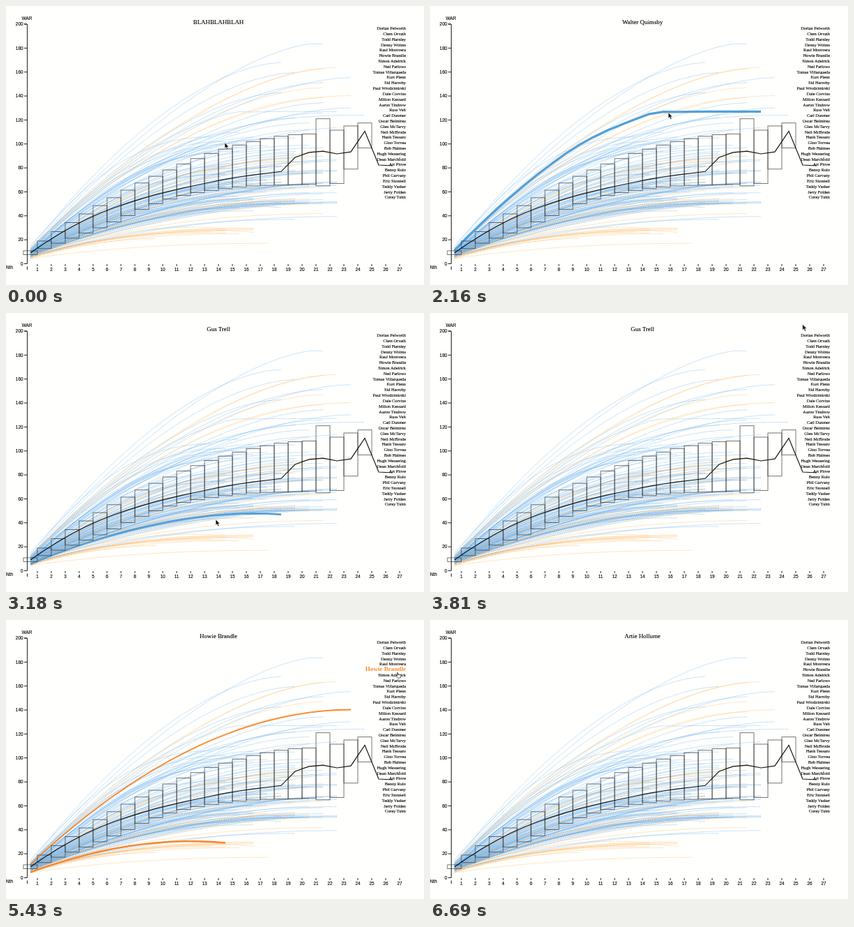
These frames come from a looping animation (600 by 400 pixels, 6.72 s). An HTML page:

```html
<!DOCTYPE html>
<html lang="en">
<head>
<meta charset="utf-8">
<title>Career WAR by season</title>
<style>
html, body { margin: 0; width: 100%; height: 100%; overflow: hidden; background: #fffffd; }
svg { display: block; width: 600px; height: 400px; }
text { fill: #000; stroke: #000; stroke-width: .12; }
.axis text { font: 6.4px "Liberation Sans", Arial, sans-serif; }
.axis path { fill: none; stroke: #222; stroke-width: 1; }
.names text { font: 6.3px "Liberation Serif", Times, serif; text-anchor: end; }
.names text.on { font-size: 9.1px; font-weight: bold; fill: #ff8a2a; stroke: none; }
#title { font: 8.9px "Liberation Serif", Times, serif; text-anchor: middle; }
.careers path { fill: none; stroke-width: .8; stroke-dasharray: 1.6 .9; opacity: .68; }
.hover path { fill: none; stroke-linejoin: round; }
.boxes rect { fill: none; stroke: #333; stroke-opacity: .75; stroke-width: .9; }
#median { fill: none; stroke: #111; stroke-width: 1.15; }
</style>
</head>
<body>
<svg viewBox="0 0 600 400">
  <g class="careers"></g>
  <g class="hover"></g>
  <g class="boxes"></g>
  <path id="median"/>
  <g class="axis"></g>
  <text id="title" x="305" y="26"></text>
  <g class="names"></g>
  <path id="arrow" d="M0 0V8.2L1.9 6.5L3.3 9.6L4.8 8.9L3.4 6H6Z" fill="#111" stroke="#fff" stroke-width=".5"/>
  <path id="hand" d="M1.4 .3Q2.4 -.3 2.6 .8V3L6.2 3.7Q7 4 6.8 5L6.1 8H2.3L-.3 5Q0 4 1.3 5Z" fill="#fff" stroke="#222" stroke-width=".7"/>
</svg>
<script>
const LOOP = 6720, FADE = 250, HOVER_WIDTH = 3.2;
const BLUE = '#529fda', ORANGE = '#fb8527';
const PALE_BLUE = '#68b0ee', PALE_ORANGE = '#ffb45e';
const $ = s => document.querySelector(s);
const X = season => 35 + 20 * season;
const Y = war => 369.5 - 1.7175 * war;
const range = (n, f) => Array.from({ length: n }, (_, i) => f(i));
const clamp = u => Math.max(0, Math.min(1, u));
const ease = u => u * u * (3 - 2 * u);

function add(parent, tag, attrs, text) {
  const el = document.createElementNS('http://www.w3.org/2000/svg', tag);
  for (const k in attrs) el.setAttribute(k, attrs[k]);
  if (text !== undefined) el.textContent = text;
  $(parent).appendChild(el);
  return el;
}

let seed = 71;
function rnd(low = 0, high = 1) {
  seed = (seed * 16807) % 2147483647;
  return low + (high - low) * seed / 2147483647;
}

// Rises steeply, flattens at the peak and declines after it.
const rise = (k, peak, power) => 1 - Math.abs(1 - k / peak) ** power;

// Smooth value at x through [x, value] keys.
function sample(keys, x) {
  const i = Math.max(0, Math.min(keys.length - 2, keys.findIndex(k => k[0] > x) - 1));
  const j = x >= keys[keys.length - 1][0] ? keys.length - 2 : i;
  const a = keys[j], b = keys[j + 1];
  const slope = (p, q) => (q[1] - p[1]) / (q[0] - p[0]);
  const w = b[0] - a[0], u = (x - a[0]) / w;
  const from = j ? slope(keys[j - 1], b) : slope(a, b) * 1.2;
  const to = slope(a, keys[j + 2] || b);
  return a[1] + (b[1] - a[1]) * ease(u) + w * u * (1 - u) * (from * (1 - u) - to * u);
}

const lineOf = wars => 'M' + wars.map((w, k) => `${X(k)} ${Y(w).toFixed(1)}`).join('L');

function career(seasons, total, power = 1.85, start = 3.5 + total * 0.055, peak = seasons) {
  return lineOf(range(seasons + 1, k => start + (total - start) * rise(k, peak, power)));
}

// Axes
for (let w = 0; w <= 200; w += 20) {
  add('.axis', 'path', { d: `M26 ${Y(w)}H30` });
  add('.axis', 'text', { x: 24.5, y: Y(w) + 2.3, 'text-anchor': 'end' }, w);
}
for (let n = 1; n <= 27; n++) {
  add('.axis', 'path', { d: `M${25 + 20 * n} 370V373` });
  add('.axis', 'text', { x: 25 + 20 * n, y: 380, 'text-anchor': 'middle' }, n);
}
add('.axis', 'path', { d: 'M26 26H30.5V369.5H26M30.5 373.5V378' });
add('.axis', 'text', { x: 22.8, y: 20 }, 'WAR');
add('.axis', 'text', { x: 0, y: 377 }, 'Nth');

// Quartile boxes and median: smooth at first, ragged where few careers remain
const lowKeys = [[0, 7.6], [5, 30], [10, 54], [15, 64], [20, 66.2]];
const midKeys = [[0, 9], [4, 37], [8, 54.4], [12, 65.8], [15, 72.5], [18, 77]];
const upper = range(21, i => 10.8 + 97.5 * rise(i, 20, 1.7)).concat(121, 111.5, 115, 117.5);
const lower = range(21, i => sample(lowKeys, i)).concat(65, 67, 79, 96.7);
const middle = range(19, i => sample(midKeys, i)).concat(88.8, 92.9, 94, 91.7, 93.4, 110.6, 82.4, 81.8);
upper.forEach((w, i) =>
  add('.boxes', 'rect', { x: 25 + 20 * i, y: Y(w), width: 20, height: Y(lower[i]) - Y(w) }));
$('#median').setAttribute('d', lineOf(middle));

// Names
const names = ['Dorian Pelworth', 'Clem Orvath', 'Todd Harnley', 'Denny Wolms', 'Raul Montvera',
  'Howie Brandle', 'Simon Adelrick', 'Ned Farlows', 'Tomas Villarqueda', 'Kurt Plenn',
  'Sid Harroby', 'Paul Wrodzimirski', 'Dale Corvins', 'Milton Kessard', 'Aaron Tindrow',
  'Russ Velt', 'Carl Dunmer', 'Oscar Belmirez', 'Glen McTarvy', 'Neil McBrode',
  'Hank Tessaro', 'Gino Torvea', 'Bob Halmes', 'Hugh Wessering', 'Dean Marchfold',
  'Art Plove', 'Benny Rulo', 'Phil Garvany', 'Eric Stonnell', 'Teddy Vasker',
  'Jerry Folden', 'Corey Tulm'];
const ROW = 7.81;
const labels = names.map((n, i) => add('.names', 'text', { x: 574, y: 34.2 + ROW * i }, n));

// Hovers on chart lines, then down the list at a steady pace
const hovers = [];
function hover(name, on, off, d, row = -1) {
  const stroke = row < 0 ? BLUE : ORANGE;
  add('.careers', 'path', { d, stroke: row < 0 ? PALE_BLUE : PALE_ORANGE });
  hovers.push({ name, row, on, off, path: add('.hover', 'path', { d, stroke }) });
}
const LIST_START = 4450, ROW_TIME = 178;
const plateau = [[0, 11], [8, 92], [14, 125], [16, 126.7], [22, 127]];
hover('Dock Hale', 700, 1560, career(21, 184, 1.57, 15, 20.5));
hover('Walter Quimsby', 1760, 2560, lineOf(range(23, k => sample(plateau, k))));
hover('Gus Trell', 2840, 3080, career(18, 47.8, 1.86, 5.5, 16));
[
  career(16, 28.5, 1.8, 5.5, 12.5),
  career(17, 17, 2.2),
  career(14, 80, 1.6),
  career(21, 163, 1.6),
  career(14, 30.5, 1.93, 4.4, 11.5),
  career(23, 140.3, 1.95, 11),
  career(9, 21),
  career(16, 60)
].forEach((d, row) => {
  const on = LIST_START + ROW_TIME * row;
  hover(names[row], row ? on : on - 260, on + ROW_TIME, d, row);
});
hover('Artie Hollume', 6200, 6300, career(24, 124, 2.5));

// Remaining careers: leaders, short careers, thin lower edge and the main crowd
function crowd(count, total, seasons, power, orangeShare) {
  for (let i = 0; i < count; i++) {
    const war = total(i);
    add('.careers', 'path', {
      d: career(Math.round(rnd(...seasons)), war, rnd(...power), rnd(3, 6) + war * 0.05),
      stroke: rnd() < orangeShare ? PALE_ORANGE : PALE_BLUE
    });
  }
}
crowd(14, i => 168 - 4.2 * i, [18, 23], [1.65, 1.8], 0.25);
crowd(7, i => 25 + 0.8 * i, [13, 17], [2.1, 2.4], 1);
crowd(5, i => 37 + 2.4 * i, [14, 22], [2, 2.2], 0.2);
crowd(112, () => 50 + 62 * rnd() ** 1.35, [13, 22.5], [1.6, 2.2], 0.18);

// Pointer track: time, x, y
const LIST_END = 5870;
const track = [[0, 314, 196], [1380, 352.5, 76], [1560, 352, 80], [1850, 343, 150],
  [2500, 341, 156], [3180, 301, 296], [3900, 545, 4], [4190, 556, 32],
  [LIST_START, 556, 32], [LIST_END, 562, 32 + 8 * ROW], [6250, 505, 157], [6420, 420, 400]];

function pointerAt(t) {
  const i = track.findIndex(k => k[0] > t);
  if (i < 0) return null;
  const a = track[i - 1], b = track[i];
  const raw = (t - a[0]) / (b[0] - a[0]);
  const u = a[0] === LIST_START ? raw : ease(raw);
  return [a[1] + (b[1] - a[1]) * u, a[2] + (b[2] - a[2]) * u];
}

function place(el, pos, visible) {
  el.setAttribute('display', visible ? 'inline' : 'none');
  if (visible) el.setAttribute('transform', `translate(${pos})`);
}

function render(t) {
  let title = 'BLAHBLAHBLAH', row = -1;
  for (const h of hovers) {
    const grown = ease(clamp((Math.min(t, h.off) - h.on) / FADE));
    const size = grown * (1 - ease(clamp((t - h.off) / FADE)));
    h.path.setAttribute('stroke-width', HOVER_WIDTH * Math.sqrt(size));
    h.path.setAttribute('display', size > 0.02 ? 'inline' : 'none');
    if (t >= h.on) title = h.name;
    if (t >= h.on && t < h.off) row = h.row;
  }
  $('#title').textContent = title;
  labels.forEach((el, i) => el.setAttribute('class', i === row ? 'on' : ''));
  const pos = pointerAt(t);
  place($('#arrow'), pos, pos && row < 0);
  place($('#hand'), pos, pos && row >= 0);
}

const begin = performance.now();
function tick() {
  render((performance.now() - begin) % LOOP);
  requestAnimationFrame(tick);
}
tick();
</script>
</body>
</html>
```
